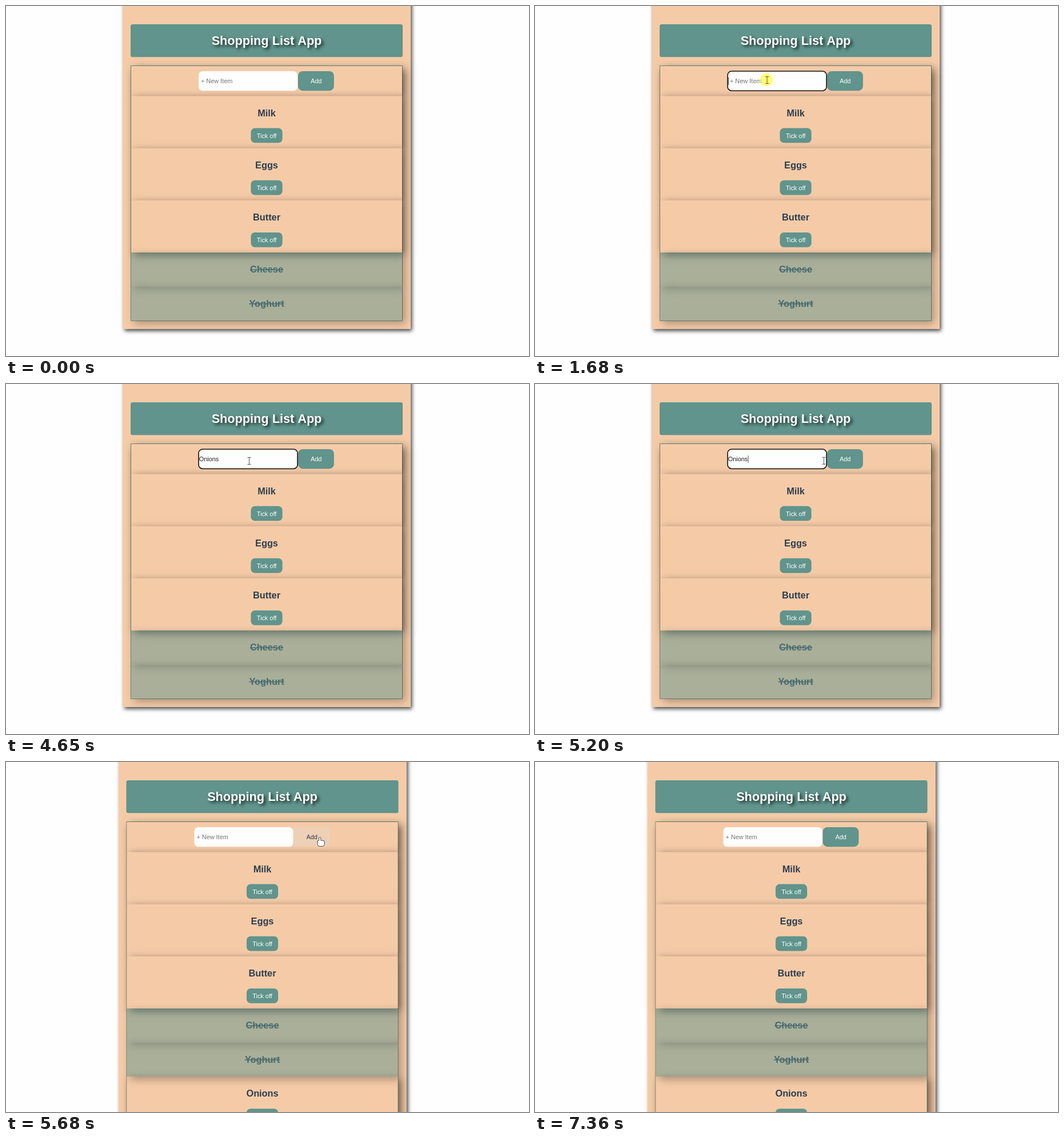
Write an HTML page with a canvas that moves like this. It is 915 by 612 pixels and loops after 8000 ms.

```html
<!DOCTYPE html>
<html lang="en">
<head>
<meta charset="utf-8">
<title>Shopping List App</title>
<style>
  html, body { margin: 0; width: 100%; height: 100%; overflow: hidden; background: #fefefe; }
  canvas { display: block; }
</style>
</head>
<body>
<canvas id="stage" width="915" height="612"></canvas>
<script>
const ctx = document.getElementById('stage').getContext('2d');
const LOOP = 8000;
const PEACH = '#f5cba7', TEAL = '#60948c', INK = '#2c3e50', PALE = '#eed0b6', WHITE = '#fefefe';
const FONT = '"Liberation Sans", Arial, sans-serif';
const CENTER = 456, LEFT = 218, WIDTH = 476;

// Moments in ms
const FOCUS = 1680, TYPING = 2870, PRESS = 5410, ADDED = 5680, HIDE = 7360;
const KEY_GAP = 250, BLINK = 530, CLICK = 190;
const WORD = 'Onions';

// Pointer moves along quadratic curves, in equal steps
const MOVES = [
  { start: 460, end: 1200, steps: 11, from: [794, 564], via: [294, 266], to: [393, 146] },
  { start: 1270, end: 1480, steps: 3, from: [394, 142], via: [400, 135], to: [406, 129.5] },
  { start: 4650, end: 5410, steps: 11, from: [425.5, 134.5], via: [490, 136], to: [549, 132] },
  { start: 6340, end: 7090, steps: 11, from: [530, 138], via: [400, 190], to: [855, 315] }
];

const ITEMS = [
  { name: 'Milk' }, { name: 'Eggs' }, { name: 'Butter' },
  { name: 'Cheese', done: true }, { name: 'Yoghurt', done: true }
];

const rowHeight = item => item.done ? 59.5 : 91.2;

// The page moves left when its scrollbar appears.
const shift = t => t >= ADDED ? -7.5 : 0;

function roundBox(x, y, w, h, r, fill) {
  ctx.beginPath();
  ctx.roundRect(x, y, w, h, r);
  ctx.fillStyle = fill;
  ctx.fill();
}

function text(str, x, y, size, color, { bold = false, align = 'center' } = {}) {
  ctx.font = `${bold ? 'bold ' : ''}${size}px ${FONT}`;
  ctx.textAlign = align;
  ctx.fillStyle = color;
  ctx.fillText(str, x, y);
}

function setShadow(dx, dy, blur, alpha) {
  ctx.shadowOffsetX = dx;
  ctx.shadowOffsetY = dy;
  ctx.shadowBlur = blur;
  ctx.shadowColor = `rgba(0,0,0,${alpha})`;
}

// Like a CSS box-shadow: the caster stays off stage, nothing is painted beneath the box.
function shadowedBox(x, y, w, h, fill, offset, blur, alpha) {
  const away = 2000;
  ctx.save();
  ctx.beginPath();
  ctx.rect(-50, -100, 1100, 900);
  ctx.rect(x, y, w, h);
  ctx.clip('evenodd');
  setShadow(away + offset, offset, blur, alpha);
  ctx.fillStyle = '#000';
  ctx.fillRect(x - away, y, w, h);
  ctx.restore();
  ctx.fillStyle = fill;
  ctx.fillRect(x, y, w, h);
}

function drawRow(y, h, done) {
  const fill = done ? 'rgba(96,148,140,.5)' : PEACH;
  shadowedBox(LEFT + 1, y, WIDTH - 2, h, fill, 5, 14, done ? 0.3 : 0.6);
}

function drawItem({ name, done, y, h }) {
  const base = y + 35.4;
  drawRow(y, h, done);
  text(name, CENTER, base, 16.3, done ? '#476b70' : INK, { bold: true });
  if (done) {
    const w = ctx.measureText(name).width;
    ctx.fillRect(CENTER - w / 2, base - 5.8, w, 1.5);
  } else {
    roundBox(CENTER - 27.6, y + 56.3, 55.2, 25.7, 7, TEAL);
    text('Tick off', CENTER, y + 73.2, 10.9, WHITE);
  }
}

function drawInput(t, pressed) {
  const x = pressed ? 335.3 : 337, y = pressed ? 115.6 : 114;
  const w = 173, h = 34.2;
  const focused = t >= FOCUS && t < PRESS;
  roundBox(x, y, w, h, 7, WHITE);
  if (focused) {
    ctx.beginPath();
    ctx.roundRect(x, y, w, h, 7);
    ctx.lineWidth = 1.6;
    ctx.strokeStyle = '#101010';
    ctx.stroke();
  }

  const keys = Math.min(WORD.length, Math.max(0, Math.floor((t - TYPING) / KEY_GAP) + 1));
  const typed = t < ADDED ? WORD.slice(0, keys) : '';
  if (typed) text(typed, x + 0.8, y + 21.3, 10.9, '#222', { align: 'left' });
  else text('+ New Item', x + 3.9, y + 21.3, 10.9, '#757575', { align: 'left' });

  const lastKey = keys ? TYPING + (keys - 1) * KEY_GAP : FOCUS;
  if (focused && Math.floor((t - lastKey) / BLINK) % 2 === 0) {
    ctx.fillStyle = '#555';
    ctx.fillRect(x + 1.1 + (typed ? ctx.measureText(typed).width : 0), 125, 0.9, 13);
  }
}

function drawAdd(hover, pressed) {
  if (pressed) {
    ctx.fillStyle = PALE;
    ctx.fillRect(510, 114, 65, 37);
    ctx.strokeStyle = TEAL;
    ctx.lineWidth = 1;
    ctx.strokeRect(510.5, 114.5, 64, 36);
  } else {
    roundBox(511, 114, 62.8, 34.2, hover ? 0 : 8, hover ? PALE : TEAL);
  }
  text('Add', 542.6, pressed ? 136.8 : 135.3, 10.9, hover || pressed ? INK : WHITE);
}

function drawTitle() {
  roundBox(LEFT, 32, WIDTH, 57.3, 3.5, TEAL);
  ctx.save();
  setShadow(3.4, 3.4, 5, 0.75);
  text('Shopping List App', CENTER, 67.7, 21.7, WHITE, { bold: true });
  ctx.restore();
}

function drawApp(t, hover) {
  const pressed = t >= PRESS && t < ADDED;
  const top = pressed ? 160 : 157.3;
  let bottom = top;
  const items = (t >= ADDED ? [...ITEMS, { name: WORD }] : ITEMS).map(item => {
    const placed = { ...item, y: bottom, h: rowHeight(item) };
    bottom += placed.h;
    return placed;
  });

  ctx.save();
  ctx.translate(shift(t), 0);
  shadowedBox(204, -30, 504, bottom + 44.6, PEACH, 3.4, 6.8, 0.75);
  drawTitle();
  ctx.strokeStyle = TEAL;
  ctx.lineWidth = 1;
  ctx.strokeRect(LEFT + 0.5, 104.5, WIDTH - 1, bottom - 104);
  drawRow(105, top - 105, false);
  drawInput(t, pressed);
  drawAdd(hover, pressed);
  // Translucent rows lie above the opaque ones.
  items.filter(item => !item.done).forEach(drawItem);
  items.filter(item => item.done).forEach(drawItem);
  ctx.restore();
}

function pointerAt(t) {
  const move = MOVES.filter(m => m.start <= t).pop();
  if (!move) return null;
  const { start, end, steps, from, via, to } = move;
  const u = Math.min(1, Math.floor((t - start) / (end - start) * steps + 1e-6) / steps);
  const v = 1 - u;
  return from.map((a, i) => v * v * a + 2 * u * v * via[i] + u * u * to[i]);
}

function partUnder(pos, t) {
  if (!pos) return '';
  const x = pos[0] - shift(t), y = pos[1];
  if (y < 114 || y > 148.5) return '';
  if (x >= 337 && x <= 510) return 'input';
  return x > 511 && x < 574 ? 'add' : '';
}

function drawBeam() {
  ctx.strokeStyle = '#444';
  ctx.lineWidth = 0.9;
  ctx.beginPath();
  for (const end of [-6, 6]) {
    ctx.moveTo(-3, end);
    ctx.lineTo(3, end);
  }
  ctx.moveTo(0, -6);
  ctx.lineTo(0, 6);
  ctx.stroke();
}

function drawHand() {
  ctx.beginPath();
  ctx.roundRect(-1.2, 0, 2.6, 10, 1.3);
  ctx.roundRect(-3.6, 5.6, 11.4, 9.4, [2, 3, 4, 4]);
  ctx.stroke();
  ctx.fill();
}

function drawArrow() {
  ctx.beginPath();
  ctx.lineTo(0, 0);
  ctx.lineTo(0, 11.6);
  ctx.lineTo(2.6, 9.2);
  ctx.lineTo(4.3, 13.2);
  ctx.lineTo(6, 12.4);
  ctx.lineTo(4.4, 8.6);
  ctx.lineTo(8, 8.4);
  ctx.closePath();
  ctx.fill();
  ctx.stroke();
}

function drawPointer([x, y], part) {
  ctx.save();
  ctx.translate(x, y);
  ctx.fillStyle = '#fff';
  ctx.strokeStyle = '#222';
  ctx.lineWidth = part === 'add' ? 1.6 : 0.8;
  if (part === 'input') drawBeam();
  else if (part === 'add') drawHand();
  else drawArrow();
  ctx.restore();
}

function drawClick(x, y) {
  ctx.beginPath();
  ctx.arc(x, y, 11, 0, 2 * Math.PI);
  ctx.fillStyle = 'rgba(255,255,0,.55)';
  ctx.fill();
}

function draw(t) {
  ctx.fillStyle = WHITE;
  ctx.fillRect(0, 0, 915, 612);
  const pos = pointerAt(t);
  const part = partUnder(pos, t);
  // The button lets go of its hover look one step late.
  const hover = part === 'add' || partUnder(pointerAt(t - 68), t) === 'add';
  drawApp(t, hover);
  if (t >= FOCUS && t < FOCUS + CLICK) drawClick(405, 129);
  if (t >= PRESS && t < ADDED) drawClick(548.5, 132);
  if (pos && t < HIDE) drawPointer(pos, part);
}

let begin;
function tick(now) {
  begin ??= now;
  draw((now - begin) % LOOP);
  requestAnimationFrame(tick);
}
draw(0);
requestAnimationFrame(tick);
</script>
</body>
</html>
```
